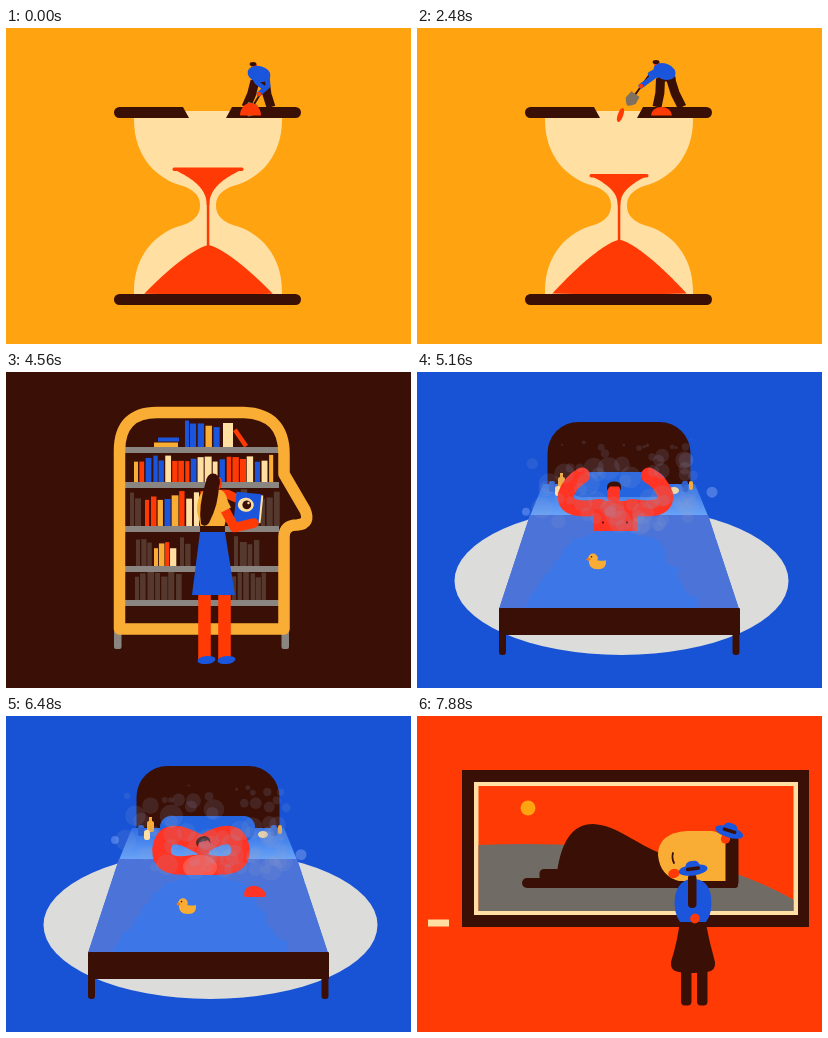
Animation of 405x316 px, one loop 8 s. Source, as an HTML page with a canvas:

```html
<!DOCTYPE html>
<html lang="en">
<head>
<meta charset="utf-8">
<title>Four scenes</title>
<style>
html, body { margin: 0; width: 100%; height: 100%; overflow: hidden; background: #ffa310; }
canvas { display: block; width: 100vw; height: 100vh; }
</style>
</head>
<body>
<canvas id="stage"></canvas>
<script>
const W = 405, H = 316, LOOP = 8000;
const C = {
  orange: '#ffa310', cream: '#ffdfa2', dark: '#3a1006', red: '#ff3a04', blue: '#1a55dc',
  yellow: '#faad35', gray: '#8b8581', stone: '#716b66', dim: '#55392f', skin: '#ff3424'
};
const canvas = document.getElementById('stage');
const g = canvas.getContext('2d');

// ---- helpers
const clamp = v => Math.max(0, Math.min(1, v));
const lerp = (a, b, k) => a + (b - a) * k;
const mix = (a, b, k) => a.map((v, i) => lerp(v, b[i], k));
const ease = (t, from, to) => {
  const k = clamp((t - from) / (to - from));
  return k * k * (3 - 2 * k);
};
function seeded(seed) {
  return () => (seed = (seed * 16807) % 2147483647) / 2147483647;
}
function rect(x, y, w, h, color, r = 0) {
  g.fillStyle = color;
  g.beginPath();
  g.roundRect(x, y, w, h, r);
  g.fill();
}
function oval(x, y, rx, ry, color, turn = 0) {
  g.fillStyle = color;
  g.beginPath();
  g.ellipse(x, y, rx, ry, turn, 0, 7);
  g.fill();
}
const dot = (x, y, r, color) => oval(x, y, r, r, color);
const shape = (d, color) => { g.fillStyle = color; g.fill(new Path2D(d)); };
function curve(d, width, color, cap = 'round') {
  g.strokeStyle = color;
  g.lineWidth = width;
  g.lineCap = cap;
  g.lineJoin = 'round';
  g.stroke(new Path2D(d));
}
// two straight bones; bend pushes the joint sideways
function limb([ax, ay], [bx, by], bend, width, color, cap) {
  const jx = (ax + bx) / 2 - (by - ay) * bend, jy = (ay + by) / 2 + (bx - ax) * bend;
  curve(`M${ax} ${ay}L${jx} ${jy}L${bx} ${by}`, width, color, cap);
}
// a form symmetric about x, given its half width at each share of its height
function profile(x, top, bottom, half, color) {
  g.beginPath();
  for (let i = -40; i <= 40; i++) {
    const v = 1 - Math.abs(i) / 40;
    g.lineTo(x + Math.sign(i) * half(v), lerp(top, bottom, v));
  }
  g.closePath();
  g.fillStyle = color;
  g.fill();
}
function placed(x, y, turn, paint) {
  g.save();
  g.translate(x, y);
  g.rotate(turn);
  paint();
  g.restore();
}
function mirrored(axis, paint) {
  g.save();
  g.translate(axis * 2, 0);
  g.scale(-1, 1);
  paint();
  g.restore();
}
function clipped(d, paint) {
  g.save();
  g.clip(new Path2D(d));
  paint();
  g.restore();
}

// ---- hourglass
function glassHalf() {
  const side = () => shape('M202.5 83H128V92C128 128 150 151 177 158Q194 164 194 177V178H202.5Z', C.cream);
  side();
  mirrored(202, side);
}

function hourglass(t) {
  rect(0, 0, W, H, C.orange);
  glassHalf();
  g.save();
  g.translate(0, 355);
  g.scale(1, -1);
  glassHalf();
  g.restore();
  sand(t / 2480);
  rect(108, 266, 187, 11, C.dark, 5.5);
  const lid = () => shape('M113.5 79H177L183 90H113.5A5.5 5.5 0 0 1 113.5 79Z', C.dark);
  lid();
  mirrored(201.5, lid);
  digger((t % 1600) / 1600);
}

function sand(s) {
  const half = 34 - 6 * s, top = 141 + 6.5 * s;
  profile(202, top, 178, v => 1.3 + half * (1 - v) ** 2.4, C.red);
  rect(202 - half - 1.5, top - 1.5, half * 2 + 3, 3.5, C.red, 1.7);
  rect(200.8, 172, 2.5, 60, C.red);
  profile(202.5, 217 - 5.5 * s, 267, v => (65.5 + 3 * s) * v ** .74, C.red);
}

function digger(p) {
  const k = ease(p, .12, .49) - ease(p, .62, .95);
  const at = (a, b) => mix(a, b, k);
  const [x, y] = at([253, 46], [247.5, 43.5]);
  const tip = at([245, 81], [215, 71]), grip = at([253, 66], [224, 58]);
  const handle = at([258, 60], [233, 46]);

  limb([x - 4, y + 7], [240, 79], -.04, 9, C.dark, 'butt');
  limb([x + 6, y + 7], [265, 79], .04, 9, C.dark, 'butt');
  rect(x - 7, y + 4, 18, 6, C.dark, 2);
  const [hx, hy] = at([248, 38], [240, 36]);
  dot(hx, hy, 3, C.red);
  oval(hx - 1, hy - 2, 3.4, 2, C.dark);
  oval(x, y, 11.5, 8, C.blue, lerp(.2, .35, k));
  curve(`M${handle}L${tip}`, 2, C.dark);
  limb([x + 8, y], grip, lerp(-.25, .1, k), 5, C.blue);
  limb([x - 7, y], handle, .1, 4.5, C.blue);
  dot(...grip, 2.2, C.red);

  placed(...tip, lerp(.35, .62, k), () => {
    shape('M-5 -6H5L6 2Q3 7 0 8Q-3 7 -6 2Z', '#80705f');
    if (p > .15 && p < .5) dot(0, 0, 5, C.red);
  });
  g.beginPath();
  g.ellipse(244.5, 87.5, 10.5, lerp(12.5, 8.5, k), 0, Math.PI, 0);
  g.fillStyle = C.red;
  g.fill();
  if (p > .5 && p < .72) {
    const f = (p - .5) / .05;
    oval(213 - 9.5 * Math.min(f, 1), 72 + 12 * f + 3 * f * f, 2.7, 7.5, C.red, .35);
  }
}

// ---- bookcase
const BRIGHT = [C.red, C.blue, C.yellow, C.cream, C.blue, C.red];

function shelf(seed, from, to, base, tall, hues) {
  const rnd = seeded(seed);
  for (let x = from; x < to;) {
    const w = 4 + rnd() * 3, h = tall * (.72 + .28 * rnd());
    rect(x, base - h, w, h, hues[Math.floor(rnd() * hues.length)]);
    x += w + .6 + rnd() * 1.4;
  }
}

function books() {
  const dim = [C.dim];
  shelf(7, 179, 210, 75, 27, BRIGHT);
  shelf(23, 128, 264, 110, 28, BRIGHT);
  shelf(5, 124, 136, 154, 37, dim);
  shelf(61, 139, 196, 154, 36, BRIGHT);
  shelf(9, 230, 268, 154, 37, dim);
  shelf(12, 130, 145, 194, 30, dim);
  shelf(31, 148, 171, 194, 24, BRIGHT);
  shelf(14, 174, 184, 194, 30, dim);
  shelf(15, 228, 254, 194, 30, dim);
  shelf(16, 129, 176, 228, 31, dim);
  shelf(17, 226, 257, 228, 30, dim);
  rect(148, 70.5, 24, 4.5, C.yellow);
  rect(152, 65.5, 21, 4, C.blue);
  rect(217, 51, 10, 24, C.cream);
  placed(234.5, 66, -.6, () => rect(-2.3, -10, 4.6, 20, C.red));
}

function library(t) {
  rect(0, 0, W, H, C.dark);
  for (const x of [108, 275.5]) rect(x, 258, 7.5, 19, C.gray, 2);
  books();
  for (const y of [75, 110, 154, 194, 228]) rect(118, y, 155, 6, C.gray);
  curve('M113.5 257V79Q113.5 40.5 151 40.5H238Q278 42 278 82V102L299 138Q305 152 291 153Q278 153 278 165V257Z', 11.5, C.yellow);
  reader(t);
}

function reader(t) {
  const k = ease(t, 3800, 4360), q = 1 - k;
  const reach = q * 2 * Math.sin((t - 3680) / 220);
  const lean = .09 * q;
  g.save();
  g.transform(1, 0, -lean, 1, 12 * q + lean * 156, -3 * q);

  for (const x of [198.5, 218.5]) {
    rect(x - 6.3, 218, 12.6, 69, C.red);
    oval(x + 2, 288, 9, 4, C.blue, .25 * q - .1);
  }
  limb([212, 122], [lerp(223 + reach, 230, k), lerp(113, 126, k)], -.1, 9, C.red);
  if (t > 3900) heldBook(lerp(230, 242, k), lerp(120, 136, k), .1 * k);
  shape('M199 118H215Q223 122 222 139L218 156H195L191 139Q191 122 199 118Z', C.yellow);
  const hand = [lerp(238, 248, k), lerp(169 + reach, 151, k)];
  limb([219, 138], hand, lerp(.05, .38, k), 9.5, C.red);
  curve('M214 126L220 138', 11, C.yellow, 'butt');
  rect(194, 154, 25, 7, C.dark);
  shape('M194 160H219L229 223H186Z', C.blue);

  oval(213, 111, 3, 6, C.red);
  oval(207, 110, 7, 8.5, C.dark);
  shape('M200 109Q192 135 195 152Q199 156 203 151Q213 132 213 111Z', C.dark);
  g.restore();
}

function heldBook(x, y, turn) {
  placed(x, y, turn, () => {
    rect(-11, -14, 25, 28, C.cream);
    rect(-13, -15, 25, 30, C.blue);
    oval(-2.5, -3, 8, 7, C.cream);
    dot(-1.5, -3, 4.4, C.dark);
    dot(0, -5, 1.2, C.cream);
  });
}

// ---- bath in bed
function bath(t) {
  const k = ease(t, 5780, 6360);
  const s = (t - 5720) / 1000;
  rect(0, 0, W, H, '#1853d6');
  oval(204.5, 209, 167, 74, '#dcdcda');
  rect(130.5, 50, 143, 80, C.dark, [31, 31, 0, 0]);
  const glow = g.createLinearGradient(0, 110, 0, 144);
  glow.addColorStop(0, '#2c6be4');
  glow.addColorStop(1, '#6aa5f8');
  shape('M126 112H278L291 144H113Z', glow);
  rect(154, 100, 95, 25, '#2464df', 11);
  const water = 'M113 143H291L322 237H82Z';
  shape(water, '#3d76e6');
  clipped(water, () => foam(s));
  bottles();
  bather(k, s);
  duck(180 + k, 190 + .8 * Math.sin(s * 4));
  bubbles(s);
  for (const x of [82, 315.5]) rect(x, 237, 7, 46, C.dark, 3);
  rect(82, 236, 241, 27, C.dark, 1);
}

// foam hugs both edges and thins out towards the foot of the bed
function foam(s) {
  const rnd = seeded(41);
  g.beginPath();
  for (let i = 0; i < 130; i++) {
    const right = i % 2, u = rnd() ** 1.5;
    const inset = rnd() * lerp(72, right ? 32 : 10, Math.sqrt(u));
    const edge = right ? lerp(291, 322, u) - inset : lerp(113, 82, u) + inset;
    const x = edge + 1.5 * Math.sin(s * 2 + i), y = lerp(146, 234, u), r = 8 + rnd() * 8;
    g.moveTo(x + r, y);
    g.arc(x, y, r, 0, 7);
  }
  g.fillStyle = '#4c73d8';
  g.fill();
}

function bottles() {
  for (const x of [132, 265]) rect(x, 109, 6, 11, '#2d60cc', 2);
  rect(141, 105, 7, 11, C.yellow, 2);
  rect(143, 101, 3, 5, C.yellow);
  rect(138, 114, 6, 10, C.cream, 2.5);
  oval(257, 118.5, 5, 3.5, C.cream);
  rect(272, 109, 4, 9, C.yellow, 2);
}

function bather(k, s) {
  const bob = .6 * Math.sin(s * 3);
  clipped('M0 0H405V159H0Z', () => {
    rect(176.5, lerp(129, 139, k), lerp(44, 37, k), 50, C.skin, lerp(9, 17, k));
    const shoulder = mix([183, 135], [187, 148], k);
    const elbow = mix([149, 123 + bob], [155.5, 133 + bob], k);
    const hand = mix([165, 104 + bob], [192, 127 + bob], k);
    const under = mix([146, 141], [155, 154], k), over = mix([153, 110], [159, 108], k);
    const arm = () => curve(`M${shoulder}Q${under} ${elbow}Q${over} ${hand}`, lerp(16, 18.5, k), C.skin);
    arm();
    mirrored(lerp(198.5, 195, k), arm);
    const y = lerp(121, 131, k) + bob;
    rect(190.5, y - 8, 12.5, 18, C.skin, 5);
    placed(197, y - 6, -.25 * k, () => shape('M-7 4V0Q-6 -5 0 -5Q7 -5 7 0V4L5 0H-4Z', C.dark));
    if (k < .6) {
      for (const x of [186, 210]) dot(x, 150.5, 1, C.dark);
    } else {
      oval(194, 151, 17, 12, '#ff5548');
    }
  });
  if (k > .4) {
    clipped('M230 150H270V181H230Z', () => oval(249, lerp(193, 179, (k - .4) / .6), 11, 9, C.skin, .3));
  }
}

function duck(x, y) {
  placed(x, y, 0, () => {
    shape('M-8 -2Q-4 1 1 -1Q5 0 9 -1Q10 8 1 8Q-9 8 -8 -2Z', C.yellow);
    dot(-4, -3, 4.8, C.yellow);
    oval(-8.5, -2, 2, 1.4, '#f27a18');
    dot(-5.5, -4.5, .8, C.dark);
  });
}

function bubbles(s) {
  const rnd = seeded(97);
  for (let i = 0; i < 75; i++) {
    const x = i % 3 ? 195 + rnd() * 85 : 118 + rnd() * 75;
    const rise = (rnd() + s * .1 + 1) % 1;
    const r = (4 + rnd() * 8) * Math.min(1, (1 - rise) * 3);
    dot(x + 3 * Math.sin(s * 2 + i), 155 - 90 * rise, r, 'rgba(150,160,205,.14)');
  }
  dot(295, 128 + 14 * s, 5.5, 'rgba(150,180,245,.4)');
  dot(109, 133 - 12 * s, 4, 'rgba(120,160,245,.5)');
}

// ---- gallery
const PAINTING = 'M61.5 70H376.5V195H61.5Z';

function gallery(t) {
  const k = ease(t, 6640, 7640);
  rect(0, 0, W, H, C.red);
  rect(45, 54, 347, 157, C.dark);
  rect(57, 66, 324, 133, C.cream);
  shape(PAINTING, C.red);
  rect(11, 203.5, 21, 7, C.cream);
  clipped(PAINTING, () => {
    shape('M61 129Q150 125 232 136Q320 151 377 184V195H61Z', C.stone);
    dot(111, 92, 7.5, C.orange);
    rect(105, 162, 160, 10, C.dark, 5);
    rect(122.5, 153, 60, 12, C.dark, 4.5);
    shape('M139 165C143 124 156 108 176 108C200 109 220 129 246 138L264 172Z', C.dark);
    sleeper(k);
  });
  visitor(k, t);
}

function hat(x, y, turn) {
  placed(x, y, turn, () => {
    oval(0, 1, 14.5, 5.5, C.blue);
    rect(-7, -8, 14, 10, C.blue, [5, 5, 1, 1]);
    rect(-7, -2, 14, 3.5, C.dark, 1.5);
  });
}

function sleeper(k) {
  const lift = 16 * (1 - k);
  shape('M241 139Q241 117 270 115H295Q309 117 312 133V165H262Q243 160 241 139Z', C.yellow);
  rect(308.5, 118 + lift, 13, 54 - lift, C.dark, 6);
  rect(255, 165, 66, 7, C.dark, 3);
  curve('M256 137Q254.5 142 257 147', 1.8, C.dark);
  oval(257, 157.5, 5.8, 4.6, C.red, -.2);
  dot(308.5, 123 + lift, 4.7, C.red);
  hat(312.5, 115 + lift, .3 * k);
}

function visitor(k, t) {
  const dx = 3 * (k - 1), sway = .5 * Math.sin((t - 7880) / 300);
  for (const x of [264, 280]) rect(x, 246, 10.5, 43.5, C.dark, 4);
  shape('M263 203H288Q292 225 298 246Q299 255 290 256Q276 258 262 256Q253 255 254 246Q261 224 263 203Z', C.dark);
  shape('M276 163Q291 163 294 180Q296 197 289 206H263Q256 196 258 180Q262 163 276 163Z', C.blue);
  rect(271 + dx, 158, 8.5, 34, C.dark, 4);
  oval(278, 202.5 + sway, 4.8, 5, C.red, .4);
  hat(276 + dx, 153 + sway, -.14);
}

// ---- timeline
const SCENES = [[6600, gallery], [4800, bath], [3000, library], [0, hourglass]];

function draw(now) {
  const ratio = window.devicePixelRatio || 1;
  const w = Math.round(innerWidth * ratio), h = Math.round(innerHeight * ratio);
  if (canvas.width !== w || canvas.height !== h) { canvas.width = w; canvas.height = h; }
  g.setTransform(w / W, 0, 0, h / H, 0, 0);
  const t = Math.min(7880, Math.floor((now % LOOP) / 40) * 40);
  SCENES.find(([start]) => t >= start)[1](t);
}
const start = performance.now();
function tick() {
  draw(performance.now() - start);
  requestAnimationFrame(tick);
}
tick();
</script>
</body>
</html>
```
